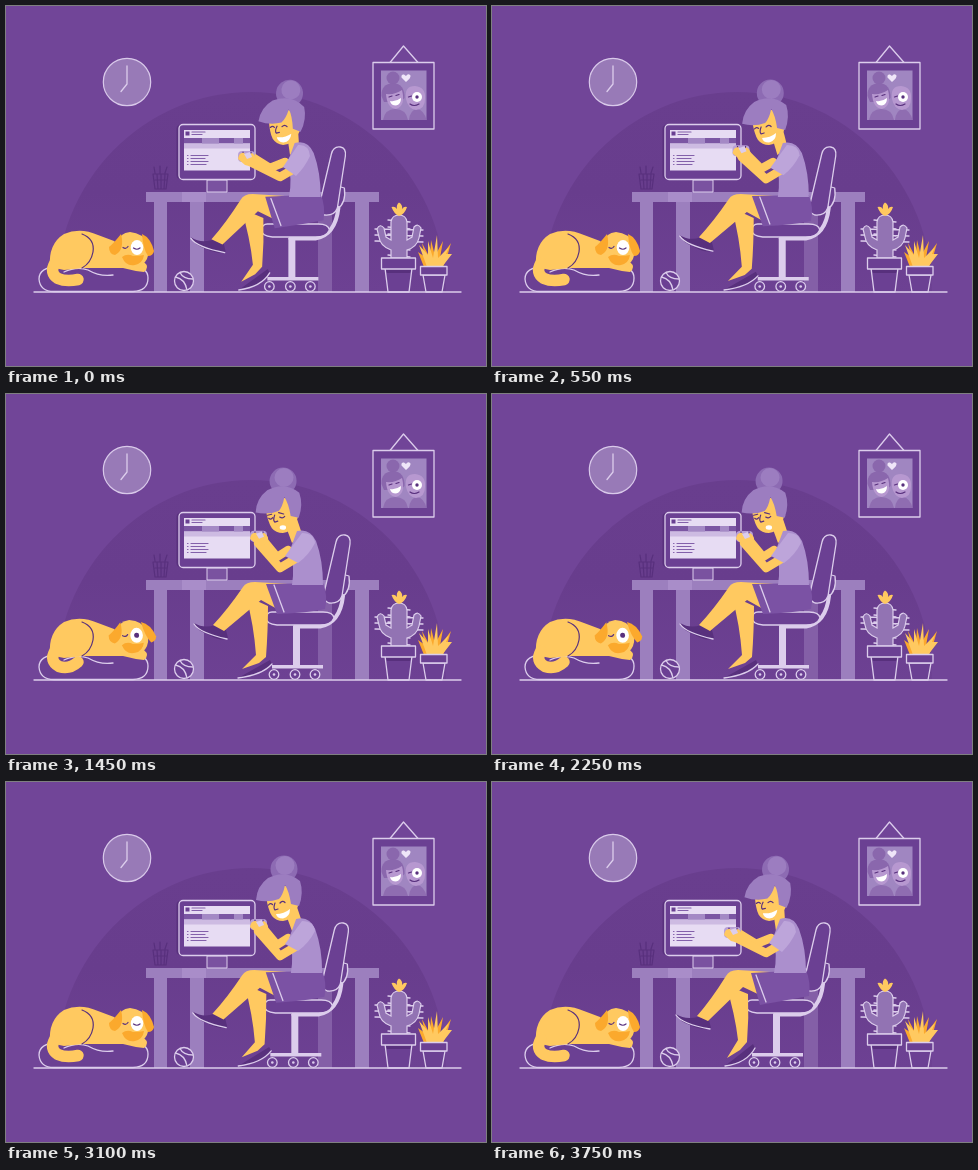
An HTML page for the animation above (3.8 s loop, 480 px wide and 360 px high).

```html
<!DOCTYPE html>
<html lang="en">
<head>
<meta charset="utf-8">
<title>Desk and dog</title>
<style>
html, body { margin: 0; width: 100%; height: 100%; overflow: hidden; background: #714598; }
svg { display: block; width: 480px; height: 360px; }
.line { fill: none; stroke: #dccdec; stroke-width: 1.3; stroke-linecap: round; stroke-linejoin: round; }
.box { fill: #6b4093; stroke: #dccdec; stroke-width: 1.3; stroke-linejoin: round; }
.dark { fill: none; stroke: #58307d; stroke-width: 1.2; stroke-linecap: round; stroke-linejoin: round; }
.skin { fill: #ffc960; }
.arm { fill: none; stroke: #ffc960; stroke-width: 8.5; stroke-linecap: round; stroke-linejoin: round; }
.ear { fill: #fba92d; }
.shoe { fill: #58307d; }
.pale { fill: #dccdec; }
</style>
</head>
<body>
<svg viewBox="0 0 480 360">
  <defs>
    <linearGradient id="fade" x1="0" y1="0" x2="0" y2="1">
      <stop offset="0" stop-color="#693e8e"/>
      <stop offset=".5" stop-color="#683d8d"/>
      <stop offset="1" stop-color="#6d4193"/>
    </linearGradient>
  </defs>
  <rect width="480" height="360" fill="#714598"/>
  <path d="M50 286A195 200 0 0 1 440 286Z" fill="url(#fade)"/>

  <g id="clock">
    <circle cx="121" cy="76" r="23.7" fill="#987ab7" stroke="#d9c9ea" stroke-width="1.2"/>
    <path class="line" d="M121 60V78L115 85.500"/>
  </g>

  <g id="portrait">
    <path class="line" d="M384 56.500L397.500 40L412 56.500"/>
    <rect class="box" x="367" y="56.500" width="61" height="66.500"/>
    <rect x="375" y="64.500" width="45.500" height="49.500" fill="#a086c1"/>
    <circle cx="387" cy="72" r="6.500" fill="#8a67ad"/>
    <path d="M375.500 90Q375 78 387 77Q399 78 398.500 92L394 96H378Z" fill="#8a67ad"/>
    <path d="M377 114Q379 103 389 103Q400 103 402 114Z" fill="#8f6db1"/>
    <path d="M380 88Q389 89 396 84Q400 100 390 103Q381 102 380 88Z" fill="#b798d0"/>
    <path d="M384 95Q390 96 395 92Q395 99 390 99.500Q385 99.500 384 95Z" fill="#fff"/>
    <path class="dark" d="M383 91l3-1M390 89.500l3-1"/>
    <path d="M403 114Q404 104 411 103Q418 104 420.500 114Z" fill="#8f6db1"/>
    <path d="M400 93Q398 80 409 80Q420 81 419 93Q419 103 410 104Q402 103 400 93Z" fill="#b798d0"/>
    <circle cx="411" cy="91" r="5" fill="#fff"/>
    <circle cx="411" cy="91" r="1.700" fill="#58307d"/>
    <path class="dark" d="M402.500 91l3-1M404 98q4 3 9 0"/>
    <path d="M400 76L395.500 71.500Q395 68 398 68.500L400 70Q402 67 404.500 69.500Q405 72 400 76Z" fill="#efe6f8"/>
  </g>

  <g id="desk">
    <path d="M312 196h14v90h-14z" fill="#845fa7"/>
    <path d="M148 196h13v90h-13zM184 196h14v90h-14zM349 196h14v90h-14z" fill="#9c7fbe"/>
    <path d="M140 186h233v10h-233z" fill="#9c7fbe"/>
    <path d="M176 186h24v10h-24z" fill="#a98dc9"/>
    <path class="dark" d="M147 168h15l-2 15h-11zM149 174h12M151 168l1 15M155 168v15M159 168l-1 15M149 167l-1-6M154 167v-7M159 167l2-6"/>
  </g>

  <g id="monitor">
    <path d="M201 174h20v12h-20z" fill="#7a52a0" stroke="#dccdec"/>
    <rect x="170.500" y="119" width="20" height="54" rx="4" fill="#58307d"/>
    <rect class="box" x="173" y="118.500" width="76" height="55" rx="4"/>
    <rect x="178" y="124" width="66" height="40.500" fill="#e7dcf3"/>
    <path d="M178 132h66v5.500h-66z" fill="#7b56a3"/>
    <path d="M178 137.500h66v5h-66z" fill="#cdbbe2"/>
    <path d="M196 132h17v5.500h-17zM228 132h9v5.500h-9z" fill="#a489c5"/>
    <path d="M179.500 125.500h4v4h-4z" fill="#693f92"/>
    <g class="dark" style="stroke:#8360aa">
      <path d="M186 126h13M186 128.500h10"/>
      <path d="M181.500 149.500h.5M181.500 152.500h.5M181.500 155.500h.5M181.500 158.500h.5"/>
      <path d="M185 149.500h17M185 152.500h14M185 155.500h17M185 158.500h15"/>
    </g>
  </g>

  <g id="plants">
    <path class="line" id="spikes"/>
    <path fill="#9273b3" stroke="#dccdec" stroke-width="1.200" d="M385 252V244Q374 240 373 231L371 223Q374 217 378 222L380 231L385 234V216Q386 209 393 209Q400 209 401 216V234L406 231L408 221Q412 217 415 222L413 232Q411 241 401 244V252Z"/>
    <path class="skin" d="M393 210Q388 208 385.500 201Q389 200 391 203Q390 199 393 196.500Q397 199 396 203Q398 200 401 201Q399 208 393 210Z"/>
    <path class="box" d="M379 262H406L403 286H382Z"/>
    <path d="M380 263H405L404 267H381Z" fill="#58307d"/>
    <path class="box" d="M375.500 252h34v11h-34z"/>
    <path class="ear" d="M418 261L412 246L419 251L416 237L424 252L425 234L429 250L437 235L434 252L445 237L441 251L437 261Z"/>
    <path class="skin" d="M421 261L413 239L422 249L422 235L427 252L431 229L432 252L443 241L440 248L446 248L436 261Z"/>
    <path class="box" d="M417 269H439L436 286H420Z"/>
    <path class="box" d="M414.500 260.500h26.500v8.500h-26.500z"/>
  </g>

  <path class="line" d="M28 286H455"/>
  <g id="ball">
    <circle class="box" cx="178" cy="275" r="9.500"/>
    <path class="line" d="M169.500 271Q179 273 181 284M174 266.500Q177 273 187 273"/>
  </g>

  <g id="dog">
    <path class="box" d="M52 261Q33 261 33 273Q34 285.500 48 285.500H127Q142 285 142 272Q142 261 126 261Z"/>
    <path class="line" d="M58 266Q71 260 82 264Q94 271 107 269"/>
    <path class="skin" d="M44 261Q42 238 58 228Q74 221 92 229L108 235L122 248L138 256Q144 261 138 266Q128 265 117 262H78L58 264Z"/>
    <path class="dark" d="M76 228Q89 233 87 246Q85 257 76 262"/>
    <path id="tail" class="skin" style="fill:none;stroke:#ffc960;stroke-width:11.500;stroke-linecap:round"/>
    <g id="dogHead">
      <path class="skin" d="M110 237Q114 227 124 226Q137 227 142 238Q144 250 139 256Q130 262 119 260Q111 252 110 237Z"/>
      <path class="ear" d="M115 228Q119 244 109 249Q103 248 103 241Q108 237 115 228Z"/>
      <ellipse cx="131" cy="241.500" rx="6.300" ry="7.500" fill="#fff"/>
      <g id="earR"><path class="ear" d="M136 228Q145 232 148 245Q147 250 142 250Q137 243 136 228Z"/></g>
      <path class="ear" d="M116 251Q121 247 127 250Q134 250 138 249Q137 257 129 259Q120 261 116 251Z"/>
      <path class="dark" d="M117 241.500q3 2 5-1"/>
      <path id="lid" class="dark" d="M127.500 242q3.500 2.500 6.500 0"/>
      <ellipse id="pupil" cx="131" cy="241.500" rx="2.500" fill="#58307d"/>
    </g>
  </g>

  <g id="chair">
    <path class="pale" d="M281 232h7v40h-7zM260 271h51v3.500h-51z"/>
    <g id="wheels"></g>
    <path class="box" d="M330 180L337 182Q339 197 330 203Z"/>
    <path class="line" style="stroke-width:4" d="M331 202Q328 229 308 232.500H283"/>
    <path class="box" d="M324 148Q326 140 333 141Q339 142 338 150L330 202Q327 210 317 209Q310 206 312 199Z"/>
    <path class="box" d="M260 218H311Q321 218 322 224Q319 231 308 231H265Q254 230 254 224Q255 218 260 218Z"/>
  </g>

  <g id="girl">
    <path id="farShoe" class="shoe"/>
    <path id="farSole" class="line"/>
    <path id="farLeg" class="skin"/>
    <path id="nearShoe" class="shoe"/>
    <path id="nearSole" class="line"/>
    <path id="nearLeg" class="skin"/>
    <path id="skirt" fill="#7b52a4"/>
    <path id="hem" class="line"/>
    <path id="farArm" class="arm"/>
    <path id="neck" class="skin"/>
    <path id="torso" fill="#ab8fcd"/>
    <g id="head">
      <circle cx="278" cy="87" r="13.500" fill="#8d6bb3"/>
      <circle cx="279" cy="83.500" r="9.500" fill="#9c7dc0"/>
      <path class="skin" d="M260 114Q262 128 266 134Q270 139 277 139Q287 138 292 124L291 104H270Z"/>
      <path d="M250 118Q251 104 262 96Q280 87 294 99Q298 111 293 124L285 122Q283 109 279 103Q277 113 273 117Q262 121 250 118Z" fill="#9c7dc0"/>
      <path class="dark" d="M269 121Q267 126 269 128L272 127"/>
      <g id="happy">
        <path class="dark" d="M262.500 123q2-2.500 4-.5M274 121q2.500-3 5-.5"/>
        <path d="M270 132Q278 132 284 127Q284 135 277 136.500Q271 136.500 270 132Z" fill="#fff"/>
      </g>
      <g id="sad">
        <path class="dark" d="M262 121l4-1M273 118.500l5 1.500"/>
        <path class="dark" d="M263 124q2 2 4-.5M274 123q3 2 5-.5"/>
        <ellipse cx="277" cy="133.500" rx="3.200" ry="2.300" fill="#fff"/>
      </g>
    </g>
    <path id="nearArm" class="arm"/>
    <path id="sleeve" fill="#bda5da"/>
    <g id="phone">
      <rect x="-9" y="-7" width="17" height="11" rx="4" fill="#b9a0d6"/>
      <path class="dark" d="M-4 -6V1M4 -6V1"/>
      <path class="skin" d="M-9 1Q-8 -6 -3 -5L0 -2L5 -5Q10 -2 9 4Q5 9 -2 7Z"/>
      <path class="pale" d="M-3 -4L3 -6L5 -1L0 1Z"/>
    </g>
  </g>
</svg>
<script>
const LOOP = 3800;
const $ = id => document.getElementById(id);
const clamp = x => Math.max(0, Math.min(1, x));
const span = (t, a, b) => clamp((t - a) / (b - a));
const sine = u => (1 - Math.cos(Math.PI * u)) / 2;
const out = u => 1 - (1 - u) ** 3;
const lerp = (a, b, p) => a + (b - a) * p;

// Pairs of paths with equal structure: leaning back, leaning in.
const lower = {
  farShoe: ["M233 284L261 262L263 266Q259 276 247 280Z", "M232 284L264 266L266 270Q259 277 247 280Z"],
  farSole: ["M233 284Q255 281 263 266", "M232 284Q256 281 266 270"],
  farLeg: ["M234 203L256 212Q257 236 255 260L248 268L235 276L246 258Q243 232 234 203Z",
           "M240 202L262 212Q262 236 260 263L253 269L236 275L250 261Q248 232 240 202Z"],
  nearShoe: ["M184 232Q193 238 206 235L217 238L219 246Q212 249 200 244Q186 239 184 232Z",
             "M188 229Q198 235 209 231L220 236L222 244Q215 248 203 241Q190 236 188 229Z"],
  nearSole: ["M184 233Q190 242 218 247", "M188 230Q194 239 221 245"],
  nearLeg: ["M205 234Q219 218 234 194Q237 188 246 188L278 190L270 214L251 205L216 239Z",
            "M207 231Q222 215 237 193Q240 188 249 188L282 190L273 216L255 206L218 237Z"],
  skirt: ["M259 191L314 188Q319 200 317 214Q300 217 268 223Z", "M260 190L317 189Q322 201 319 215Q302 219 271 220Z"],
  hem: ["M264 193L274 220", "M268 191L278 218"],
  torso: ["M288 137Q301 133 307 147Q314 166 314 191H282Q286 172 281 156Z",
          "M291 137Q304 134 310 147Q317 166 317 191H286Q289 172 284 156Z"]
};
const upper = {
  farArm: ["M279 156L264 162L246 151", "M282 156L271 163L257 146"],
  neck: ["M281 128L292 122L293 140L284 149Z", "M279 130L290 122L296 140L286 149Z"],
  nearArm: ["M286 164L274 171L244 156", "M289 165L274 174L252 149"],
  sleeve: ["M292 139Q303 138 304 150Q299 161 290 170L277 161Z", "M296 139Q308 139 309 149Q303 161 292 169L279 162Z"]
};
const tail = ["M49 257Q43 267 52 272.500Q60 276 72 273.500", "M49 257Q43 267 53 272.500Q63 276 72 268"];

const NUM = /-?\d+(\.\d+)?/g;
function morph(id, [a, b], p) {
  const to = b.match(NUM);
  let i = 0;
  $(id).setAttribute("d", a.replace(NUM, n => lerp(+n, +to[i++], p).toFixed(2)));
}
const place = (id, x, y) => $(id).setAttribute("transform", `translate(${x} ${y})`);
const turn = (id, deg, x, y) => $(id).setAttribute("transform", `rotate(${deg} ${x} ${y})`);
const show = (id, on) => $(id).setAttribute("opacity", on ? 1 : 0);

$("wheels").innerHTML = [262, 283, 303].map(x =>
  `<circle class="box" cx="${x}" cy="280.500" r="4.800"/><circle class="pale" cx="${x}" cy="280.500" r="1.300"/>`).join("");

let spikes = "";
for (let y = 214; y < 250; y += 7) spikes += `M382 ${y}l22 2`;
for (let y = 223; y < 240; y += 6) spikes += `M369 ${y}l48 1`;
$("spikes").setAttribute("d", spikes);

function draw(t) {
  const first = t < 1900;
  const late = first ? t + LOOP : t;
  const roll = first ? out(span(late, 3720, 4700)) : 1 - sine(span(t, 2760, 3720));
  const lean = first ? sine(span(late, 3780, 4450)) : 1 - sine(span(t, 3110, 3740));
  const lift = first ? sine(span(t, 550, 960)) : 1;
  const reach = lean * (.75 + .25 * lift);
  const mood = sine(span(t, 620, 960)) * (1 - sine(span(t, 2400, 2730)));
  const curl = sine(span(t, 640, 1160)) * (1 - sine(span(t, 2500, 3080)));

  place("chair", 6 * roll, 0);
  for (const id in lower) morph(id, lower[id], roll);
  for (const id in upper) morph(id, upper[id], reach);
  const fidget = Math.sin(t / 90) * .4 * mood;
  place("phone", lerp(241, 253, reach), lerp(152, 144, reach) + fidget);
  turn("head", 6 * (1 - lean) - mood, 278, 140);
  show("happy", mood < .5);
  show("sad", mood >= .5);

  morph("tail", tail, curl);
  turn("dogHead", -1.5 * mood, 124, 256);
  turn("earR", -10 * mood, 138, 230);
  const blink = Math.sin(Math.PI * span(t, 1830, 1990));
  const open = clamp(mood * 1.5 - .4) * (1 - blink);
  $("pupil").setAttribute("ry", 2.5 * open);
  show("lid", open < .25);
}

function tick() {
  draw(performance.now() % LOOP);
  requestAnimationFrame(tick);
}
tick();
</script>
</body>
</html>
```
